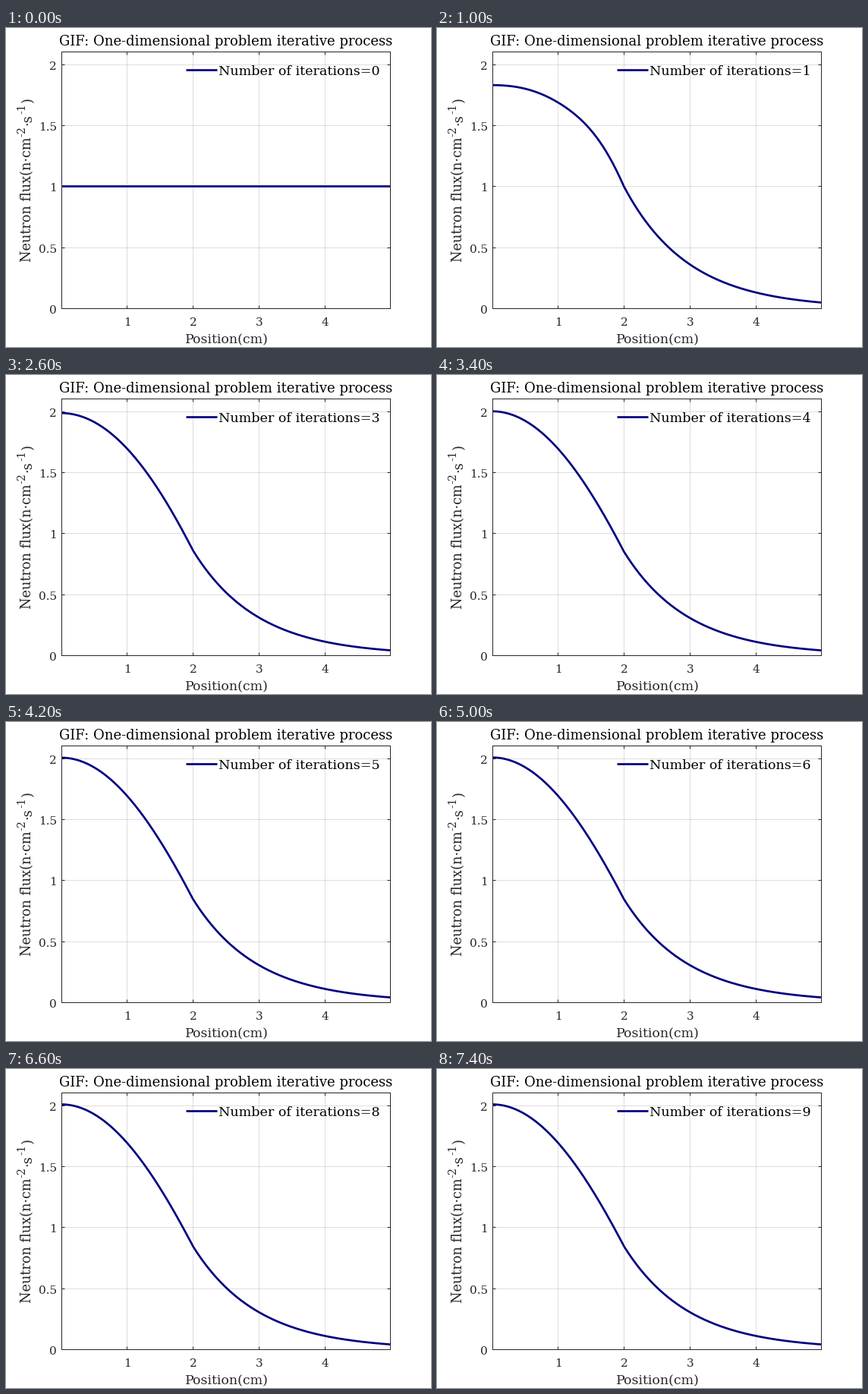
Recreate the animation shown at these times as a matplotlib script. Size 560 by 420 pixels, loop 8000 ms.

```python
import numpy as np
import matplotlib.pyplot as plt
from matplotlib.animation import FuncAnimation

W, H, DPI = 560, 420, 100
STEP, FRAMES = 200, 40
NAVY, INK = "#000080", "#262626"
CORE, EDGE, YMAX = 2.0, 5.0, 2.105
LEFT, RIGHT, TOP, BOTTOM = 72.7, 506.45, 30.95, 369.0

plt.rcParams["font.family"] = "DejaVu Serif"


def pt(px):
    return px * 72 / DPI


fig = plt.figure(figsize=(W / DPI, H / DPI), dpi=DPI, facecolor="white")
ax = fig.add_axes([LEFT / W, 1 - BOTTOM / H, (RIGHT - LEFT) / W, (BOTTOM - TOP) / H])
ax.set(xlim=(0, EDGE), ylim=(0, YMAX))
ax.set_xticks([1, 2, 3, 4], [])
ax.set_yticks([0, 0.5, 1, 1.5, 2], [])
ax.tick_params(direction="in", top=True, right=True, length=pt(4.3), width=pt(1), color=INK)
ax.grid(color=INK, alpha=0.15, lw=pt(1))
ax.set_axisbelow(True)
for spine in ax.spines.values():
    spine.set(color=INK, lw=pt(1))


def label(x, y, text, size, color=INK, ha="center", **kw):
    return fig.text(x / W, 1 - y / H, text, fontsize=pt(size), color=color,
                    ha=ha, va="baseline", **kw)


def upright_label(x, y, parts, size):
    """Text running upwards; every second part is a superscript."""
    for i, part in enumerate(parts):
        sup = i % 2
        t = label(x - 8 * sup, y, part, size * (0.8 if sup else 1), ha="left",
                  rotation=90, rotation_mode="anchor")
        y -= t.get_window_extent().height + 0.7


for v in (1, 2, 3, 4):
    label(LEFT + (RIGHT - LEFT) * v / EDGE + 0.5, 392, str(v), 15.2)
for v in (0, 0.5, 1, 1.5, 2):
    label(67, BOTTOM - (BOTTOM - TOP) * v / YMAX + 7, f"{v:g}", 15.2, ha="right")

label(290, 23.4, "GIF: One-dimensional problem iterative process", 18, "black")
label(291, 415, "Position(cm)", 17.4)
upright_label(33.5, 308, ["Neutron flux(n·cm", "-2", "·s", "-1", ")"], 17.8)

x = np.linspace(0, EDGE, 501)
curve, = ax.plot(x, np.ones_like(x), color=NAVY, lw=pt(2.7))
fig.add_artist(plt.Line2D([237 / W, 278 / W], [1 - 55.1 / H] * 2, color=NAVY, lw=pt(2.7),
                          solid_capstyle="butt"))
legend = label(280, 62, "", 17.5, "black", ha="left")

# Cosine modes of the core: wave number, first weight, shrink factor per iteration
MODES = ((0.568, 1, 1), (1.862, -0.0837, 0.34), (3.318, 0.0128, 0.14), (4.84, -0.003, 0.07))
PEAK, DECAY = 2.008, 1.02
inside = x <= CORE
s = np.minimum(x, CORE)
tail = np.exp(-DECAY * np.maximum(x - CORE, 0))
base = PEAK * np.cos(MODES[0][0] * s)


def flux(n):
    if n == 0:
        return np.ones_like(x)
    shape = sum(a * g ** (n - 1) * np.cos(b * s) for b, a, g in MODES)
    return shape * tail * base[inside].mean() / shape[inside].mean()


def update(frame):
    t = frame * STEP
    n = 0 if t < 1000 else 1 + (t - 1000) // 800
    curve.set_ydata(flux(n))
    legend.set_text(f"Number of iterations={n}")
    return curve, legend


anim = FuncAnimation(fig, update, frames=FRAMES, interval=STEP, repeat=True, repeat_delay=0)
plt.show()
```
